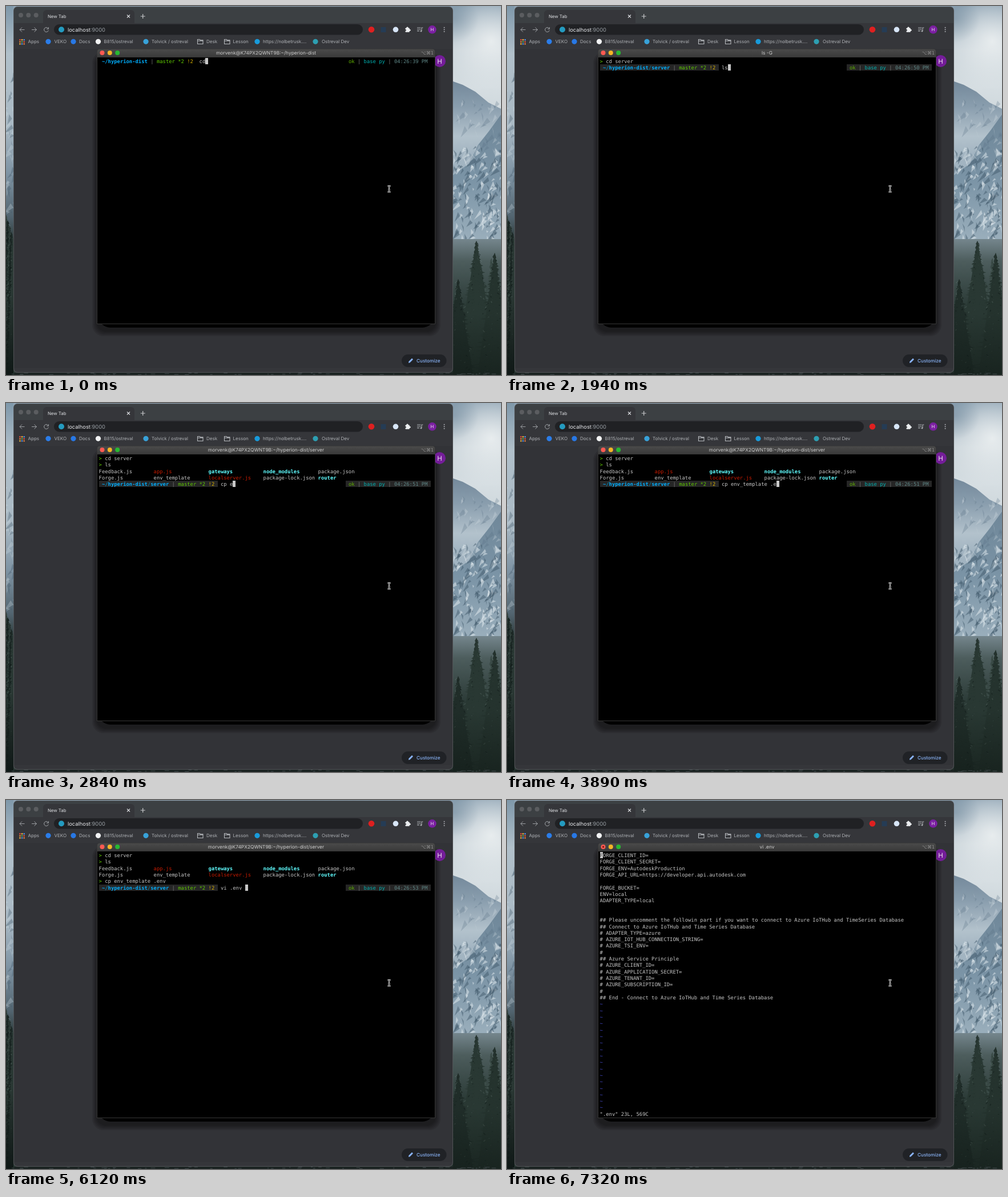
An HTML page with a canvas that plays this animation: 867 by 646 pixels, repeating every 8 s.

```html
<!DOCTYPE html>
<html lang="en">
<head>
<meta charset="utf-8">
<title>Terminal session</title>
<style>
  html, body { margin: 0; width: 100%; height: 100%; overflow: hidden; background: #222; }
  canvas { display: block; }
</style>
</head>
<body>
<canvas id="stage" width="867" height="646"></canvas>
<script>
const W = 867, H = 646, LOOP = 8000;
const UI = 'Inter, Roboto, sans-serif';
const MONO = '"DejaVu Sans Mono", monospace';
const CELL = { x: 162.6, y: 91, w: 16 / 3, h: 11.32 };

const screen = document.getElementById('stage').getContext('2d');
const backdrop = document.createElement('canvas');
backdrop.width = W;
backdrop.height = H;
let g = backdrop.getContext('2d');

let seed = 7;
const random = () => (seed = (seed * 16807) % 2147483647) / 2147483647;
const between = (a, b) => a + (b - a) * random();

function rect(x, y, w, h, color) {
  g.fillStyle = color;
  g.fillRect(x, y, w, h);
}

function round(x, y, w, h, r, color) {
  g.fillStyle = color;
  g.beginPath();
  g.roundRect(x, y, w, h, r);
  g.fill();
}

function disc(x, y, r, color) {
  g.fillStyle = color;
  g.beginPath();
  g.arc(x, y, r, 0, Math.PI * 2);
  g.fill();
}

function poly(points, color) {
  g.fillStyle = color;
  g.beginPath();
  points.forEach(([x, y]) => g.lineTo(x, y));
  g.fill();
}

function stroke(path, color, width = 1) {
  g.strokeStyle = color;
  g.lineWidth = width;
  g.stroke(new Path2D(path));
}

function text(str, x, y, size, color, { align = 'left', weight = 400, family = UI } = {}) {
  g.font = `${weight} ${size}px ${family}`;
  g.textRendering = 'geometricPrecision';
  g.textAlign = align;
  g.textBaseline = 'alphabetic';
  g.fillStyle = color;
  g.fillText(str, x, y);
}

function gradient(y0, y1, stops) {
  const fill = g.createLinearGradient(0, y0, 0, y1);
  stops.forEach(([at, color]) => fill.addColorStop(at, color));
  return fill;
}

// ---- wallpaper ----

function glow(x, y, r, rgb, alpha) {
  const fill = g.createRadialGradient(x, y, 0, x, y, r);
  fill.addColorStop(0, `rgba(${rgb},${alpha})`);
  fill.addColorStop(1, `rgba(${rgb},0)`);
  rect(x - r, y - r, r * 2, r * 2, fill);
}

function tree(x, top, spread, color) {
  poly([[x, top], [x + spread, H], [x - spread, H]], color);
  for (let y = top + 4; y < H; y += 3) {
    const w = spread * (y - top) / (H - top) + 2;
    for (const side of [-1, 1]) {
      const reach = side * w * between(0.7, 1.4);
      poly([[x, y - 4], [x + reach, y + between(0, 4)], [x, y + 5]], color);
    }
    const dab = x + between(-w, w);
    stroke(`M${dab} ${y} l${between(-4, 4)} 3`, random() < 0.5 ? 'rgba(112,132,126,.3)' : 'rgba(8,16,14,.4)', 1.4);
  }
}

// Slanted splinters of snow and bare rock.
function facets(count, x0, x1, y0, y1, snow, rock) {
  for (let i = 0; i < count; i++) {
    const x = between(x0, x1), y = between(y0, y1), len = between(4, 20), slant = between(-0.9, 0.4);
    poly([[x, y], [x + between(2, 6), y + len * 0.4], [x + slant * len, y + len]], random() < 0.5 ? snow : rock);
  }
}

function drawWallpaper() {
  rect(0, 0, W, H, gradient(0, H, [[0, '#8da2b2'], [0.12, '#c9d3d9'], [0.22, '#d6dee2'], [1, '#8496a4']]));
  glow(850, 62, 85, '236,240,241', 0.9);
  glow(786, 22, 42, '116,140,158', 0.5);

  rect(0, 0, 13, H, gradient(0, 420, [
    [0, '#7f98aa'], [0.2, '#b1c0ca'], [0.5, '#a9b9c4'], [0.7, '#7e93a3'], [0.88, '#52646f'], [1, '#27332f']]));
  facets(36, 0, 13, 110, 380, 'rgba(205,218,226,.3)', 'rgba(66,88,106,.35)');

  poly([[783, 132], [800, 138], [822, 150], [845, 169], [867, 180], [867, 430], [783, 430]],
    gradient(132, 260, [[0, '#74899b'], [0.35, '#8a9eae'], [0.75, '#b3c2cc'], [1, '#a2b4c1']]));
  poly([[867, 190], [846, 219], [827, 243], [811, 276], [783, 296], [783, 425], [867, 425]],
    gradient(190, 420, [[0, '#6f8799'], [0.5, '#7b94a6'], [1, '#9db1be']]));
  facets(50, 783, 867, 160, 270, 'rgba(222,231,236,.25)', 'rgba(84,107,126,.25)');
  facets(190, 783, 867, 245, 405, 'rgba(230,238,242,.5)', 'rgba(60,84,103,.45)');

  rect(783, 408, 84, 238, gradient(408, 600, [[0, '#75868d'], [0.2, '#4d5d5d'], [0.6, '#2c3b37'], [1, '#1b2723']]));
  for (let i = 0; i < 9; i++) {
    tree(between(783, 867), between(430, 500), between(18, 26), i % 2 ? '#3a4a46' : '#2d3c38');
  }
  tree(824, 411, 38, '#293833');
  tree(856, 432, 30, '#25332e');
  tree(792, 478, 26, '#202d29');
  rect(783, 540, 84, 106, gradient(540, 646, [[0, 'rgba(18,28,24,0)'], [1, 'rgba(18,28,24,.65)']]));

  for (let i = 0; i < 5; i++) tree(i * 3, 365 + i * 10, 9, i % 2 ? '#1c2825' : '#2b3935');
  rect(0, 500, 13, 146, gradient(500, 646, [[0, 'rgba(15,22,20,0)'], [1, '#0f1816']]));
  rect(14, 642, 769, 4, '#1a2221');
  for (let i = 0; i < 60; i++) rect(between(0, W), between(642, 645), between(2, 8), 1, '#3d4648');
}

// ---- browser ----

function folder(x) {
  stroke(`M${x} 58.5 h3.7 l1.3 1.4 h4.5 v6.6 h-9.5 z M${x} 61 h9.5`, '#b4b7bb', 1.1);
}

function drawTabs() {
  round(13, 1, 770, 641, 7, '#515356');
  round(14, 2, 768, 639, 6, '#35363a');
  round(14, 2, 768, 28, [6, 6, 0, 0], '#3c4043');
  [26, 39.3, 52.7].forEach(x => disc(x, 16, 4, '#5b5d60'));
  round(65, 7, 160, 24, [6, 6, 0, 0], '#35363a');
  text('New Tab', 73, 20.6, 7.8, '#dfe1e4');
  stroke('M212 15.5 l5 5 m0 -5 l-5 5', '#dadce0', 1.1);
  stroke('M235.7 18 h8 m-4 -4 v8', '#c8cacd', 1.2);
}

function drawToolbar() {
  stroke('M32.5 41.5 h-8.5 m4 -4 l-4 4 l4 4', '#9b9ea2', 1);
  stroke('M45 41.5 h8.5 m-4 -4 l4 4 l-4 4', '#9b9ea2', 1);
  stroke('M73.9 39.5 a3.9 3.9 0 1 0 .4 3.2 M74.4 37.2 v3 h-3', '#a4a7ab', 1);
  round(84, 32, 541, 18.5, 9.2, '#202124');
  disc(97, 41.3, 5, '#249bc0');
  text('localhost', 108, 44.7, 9.33, '#e8eaed');
  const hostWidth = g.measureText('localhost').width;
  text(':9000', 108 + hostWidth, 44.7, 9.33, '#9aa0a6');

  disc(640, 41.3, 5.3, '#df2020');
  round(656.5, 37, 9, 9, 0, '#253c55');
  disc(682.5, 41.3, 4.8, '#d7e5f7');
  round(699.5, 38.5, 7.2, 7.2, 0.8, '#eceef0');
  disc(703, 38.3, 1.7, '#eceef0');
  disc(707, 42.2, 1.7, '#eceef0');
  disc(699.7, 42.2, 1.2, '#35363a');
  stroke('M720 38 h6.5 m-6.5 2.8 h6.5 m-6.5 2.8 h4 M728 44 v-6 h2.4', '#a8abaf', 1.1);
  disc(727, 44, 1.4, '#a8abaf');
  disc(746.5, 41.3, 7.2, '#7b1fa2');
  text('H', 746.5, 44.2, 7.8, '#eee', { align: 'center' });
  [37.8, 41.3, 44.8].forEach(y => disc(767.6, y, 0.95, '#b4b7bb'));
}

function drawBookmarks() {
  const tints = ['#e64a3c', '#eb7d38', '#f0b73b', '#54a85c', '#4e8eec'];
  for (let i = 0; i < 9; i++) {
    rect(23.3 + (i % 3) * 3.6, 58 + Math.floor(i / 3) * 3.6, 2.4, 2.4, tints[(i * 2) % 5]);
  }
  [[74, '#2b7de9'], [118, '#2878e5'], [161.5, '#f3f4f5'], [245, '#38a2d9'],
   [440, '#189bdb'], [542, '#2d9fb2']].forEach(([x, color]) => disc(x, 62.3, 4.6, color));
  folder(335.5);
  folder(382.5);
  [['Apps', 38.5], ['VEKO', 84.5], ['Docs', 128], ['B815/ostreval', 171.5],
   ['Tolvick / ostreval', 255], ['Desk', 351], ['Lesson', 397.5],
   ['https://nolbetrusk....', 450], ['Ostreval Dev', 553]]
    .forEach(([label, x]) => text(label, x, 65.4, 8, '#aeb1b5'));
}

function drawPage() {
  rect(14, 75, 768, 559, '#323337');
  round(693, 610, 78.5, 22, 11, '#202226');
  poly([[705, 625], [705.5, 622.3], [711, 616.8], [713, 618.8], [707.6, 624.3]], '#8ab4f8');
  text('Customize', 719, 624, 8.2, '#8ab4f8', { weight: 500 });
}

function drawTerminalFrame() {
  for (let i = 0; i < 5; i++) {
    round(151 + i * 2, 80 + i * 2, 610 - i * 4, 498 - i * 4, 20 - i, 'rgba(12,12,14,.13)');
  }
  disc(759.5, 96.4, 10.5, '#741d99');
  text('H', 759.5, 101, 11.5, '#f0e8f3', { align: 'center' });
  round(161, 480, 590, 83, 22, '#000');
  round(159, 75, 593, 482, [5, 5, 0, 0], '#363636');
  rect(160, 90, 591, 466, '#000');
  round(160, 75.7, 591, 13.8, [4, 4, 0, 0], gradient(75, 90, [[0, '#4b4b4b'], [1, '#393939']]));
  [['#ff5a52', 168.5], ['#f6b526', 181.8], ['#28b832', 195.2]].forEach(([c, x]) => disc(x, 82, 4, c));
  text('⌥⌘1', 749, 85.2, 8, '#929292', { align: 'right', family: '"DejaVu Sans", sans-serif' });
}

function drawPointer() {
  const beam = 'M668.5 315 q2.5 0 2.5 2 v6.5 q0 2 -2.5 2 M673.5 315 q-2.5 0 -2.5 2 m0 6.5 q0 2 2.5 2 M669.3 321.7 h3.4';
  stroke(beam, '#e5e5e5', 2.3);
  stroke(beam, '#111', 0.7);
}

// ---- terminal contents ----

const INK = '#c7c7c7', GREEN = '#5fc900', RED = '#c91b00', CYAN = '#60fdff';
const BLUE = '#00afff', DIM_BLUE = '#0087af', GREY = '#777';
const HOME = 'morvenk@K74PX2QWNT9B:~/hyperion-dist';

const keys = [
  [0, 'cd'], [150, 'cd '], [300, 'cd s'], [450, 'cd ser'], [600, 'cd serv'], [740, 'cd serve'], [890, 'cd server'],
  [1190, ''], [1790, 'l'], [1940, 'ls'],
  [2090, ''], [2540, 'c'], [2690, 'cp'], [2840, 'cp e'], [2990, 'cp en'], [3140, 'cp env_template '],
  [3740, 'cp env_template .'], [3890, 'cp env_template .e'], [4040, 'cp env_template .en'], [4190, 'cp env_template .env'],
  [4480, ''], [5230, 'vi'], [5380, 'vi '], [5680, 'vi .'], [5830, 'vi .e'], [5980, 'vi .en'], [6120, 'vi .env ']];

const titles = [[0, HOME], [1190, HOME + '/server'], [1940, 'ls -G'], [2090, HOME + '/server'], [6570, 'vi .env']];

const prompts = [
  [0, { row: 0, time: '04:26:39' }], [1190, { row: 1, time: '04:26:50' }],
  [2090, { row: 4, time: '04:26:51' }], [4480, { row: 5, time: '04:26:53' }]];

const envFile = `FORGE_CLIENT_ID=
FORGE_CLIENT_SECRET=
FORGE_ENV=AutodeskProduction
FORGE_API_URL=https://developer.api.autodesk.com

FORGE_BUCKET=
ENV=local
ADAPTER_TYPE=local


## Please uncomment the followin part if you want to connect to Azure IoTHub and TimeSeries Database
## Connect to Azure IoTHub and Time Series Database
# ADAPTER_TYPE=azure
# AZURE_IOT_HUB_CONNECTION_STRING=
# AZURE_TSI_ENV=
#
## Azure Service Principle
# AZURE_CLIENT_ID=
# AZURE_APPLICATION_SECRET=
# AZURE_TENANT_ID=
# AZURE_SUBSCRIPTION_ID=
#
## End - Connect to Azure IoTHub and Time Series Database`.split('\n');

const latest = (list, t) => list.filter(([start]) => start <= t).pop()[1];
const colX = col => CELL.x + col * CELL.w;
const rowY = row => CELL.y + row * CELL.h;

function put(str, col, row, color = INK, weight = 400) {
  text(str, colX(col), rowY(row) + 9, 8.86, color, { weight, family: MONO });
}

// Writes coloured segments one after another and returns the next column.
function putAll(segments, col, row) {
  for (const [str, color, weight] of segments) {
    put(str, col, row, color, weight);
    col += str.length;
  }
  return col;
}

function cells(col, row, count, color) {
  const x = Math.round(colX(col)), y = Math.round(rowY(row));
  rect(x, y, Math.round(count * CELL.w), Math.round(CELL.h), color);
}

function drawPrompt({ row, time }, typed) {
  const path = [['~', BLUE, 700], ['/', row ? DIM_BLUE : BLUE, 700], ['hyperion-dist', BLUE, 700]];
  if (row) {
    path.push(['/', DIM_BLUE], ['server', BLUE, 700]);
    cells(0, row, 39, '#262626');
    cells(81, row, 28, '#262626');
  }
  const end = putAll([...path, [' | ', GREY], ['master *2', GREEN], [' !2', '#d7af00']], 1, row);
  putAll([['ok', '#5faf00'], [' | ', GREY], ['base py', '#00afaf'], [' | ', GREY], [time + ' PM', '#5f8787']], 82, row);
  const input = end + 2;
  put(typed, input, row);
  cells(input + typed.length, row, 1, INK);
}

function drawHistory(t) {
  const ran = (command, row) => putAll([['> ', GREEN], [command, INK]], 0, row);
  if (t >= 1190) ran('cd server', 0);
  if (t >= 2090) {
    ran('ls', 1);
    [['Feedback.js', INK], ['app.js', RED], ['gateways', CYAN, 700], ['node_modules', CYAN, 700], ['package.json', INK],
     ['Forge.js', INK], ['env_template', INK], ['localserver.js', RED], ['package-lock.json', INK], ['router', CYAN, 700]]
      .forEach(([name, color, weight], i) => put(name, (i % 5) * 18, 2 + Math.floor(i / 5), color, weight));
  }
  if (t >= 4480) ran('cp env_template .env', 4);
}

function drawEditor() {
  envFile.forEach((line, row) => put(line, 0, row));
  for (let row = envFile.length; row < 40; row++) put('~', 0, row, '#464bd0');
  put('".env" 23L, 569C', 0, 40);
  cells(0, 0, 1, INK);
  put('F', 0, 0, '#555');
}

function render(now) {
  const t = now % LOOP;
  g = screen;
  g.drawImage(backdrop, 0, 0);
  text(latest(titles, t), 455.5, 85.2, 8.4, '#cfcfcf', { align: 'center' });
  if (t < 6570) {
    drawHistory(t);
    drawPrompt(latest(prompts, t), latest(keys, t));
  } else {
    drawEditor();
  }
  if (t >= 7320) disc(168.5, 82, 1.5, '#6b0f0b');
  drawPointer();
}

drawWallpaper();
drawTabs();
drawToolbar();
drawBookmarks();
drawPage();
drawTerminalFrame();

function tick() {
  render(performance.now());
  requestAnimationFrame(tick);
}
tick();
</script>
</body>
</html>
```
